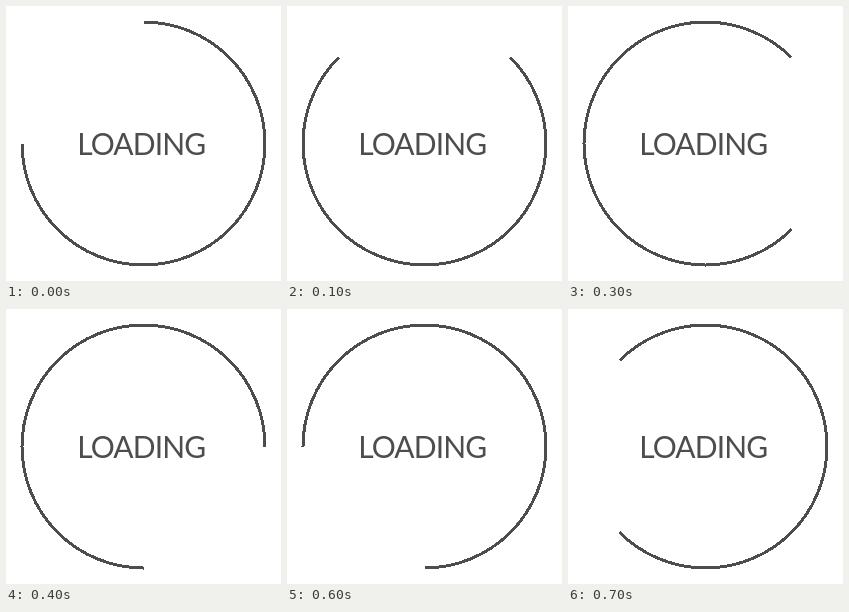
An HTML page that plays this animation: 275x275 px, repeating every 800 ms.

```html
<!DOCTYPE html>
<html lang="en">
<head>
<meta charset="utf-8">
<title>Loading</title>
<style>
  html, body { margin: 0; width: 100%; height: 100%; overflow: hidden; background: #fff; }
  svg { display: block; width: 100vw; height: 100vh; }
  .ring { fill: none; stroke: #4d4d4d; stroke-width: 3; shape-rendering: crispEdges; }
  text { font: 400 30px Lato, "Open Sans", sans-serif; letter-spacing: -0.85px; fill: #4d4d4d; }
</style>
</head>
<body>
<svg viewBox="0 0 275 275">
  <!-- three quarters of a circle, open at the top left -->
  <path class="ring" d="M137.5 16A121.5 121.5 0 1 1 16 137.5"/>
  <text x="71.2" y="149">LOADING</text>
</svg>
<script>
  const LOOP = 800, STEPS = 8;
  const ring = document.querySelector('.ring');
  const start = performance.now();

  function draw(now) {
    const t = Math.max(0, now - start) % LOOP;
    const step = Math.floor(t / LOOP * STEPS);
    ring.setAttribute('transform', `rotate(${step * 360 / STEPS} 137.5 137.5)`);
    requestAnimationFrame(draw);
  }
  draw(start);
</script>
</body>
</html>
```
